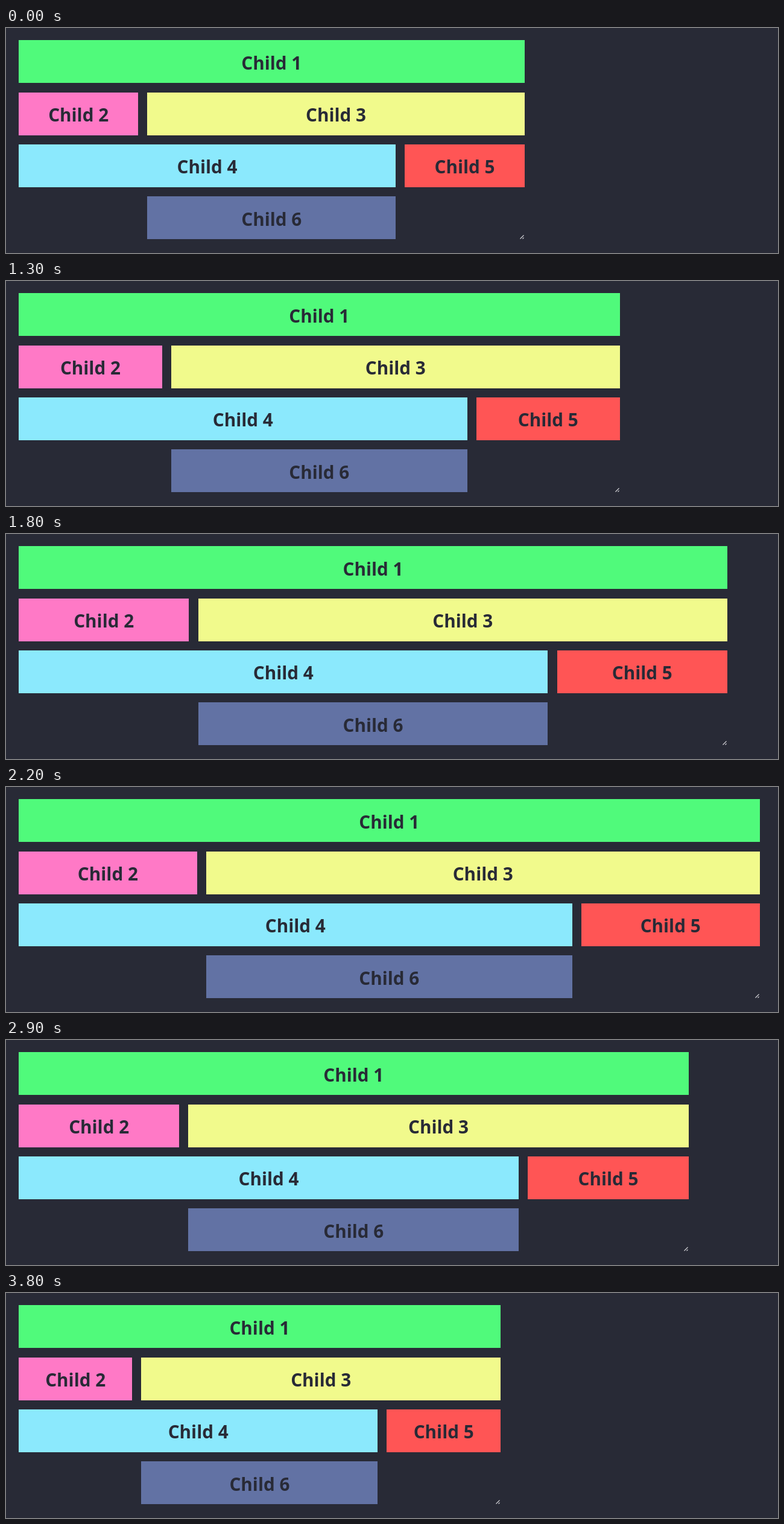
Write an HTML page that moves like this. It is 1280x373 px and loops after 5000 ms.

```html
<!DOCTYPE html>
<html lang="en">
<head>
<meta charset="utf-8">
<title>Resizable grid</title>
<style>
  html, body { margin: 0; width: 100%; height: 100%; overflow: hidden; background: #282a36; }
  svg { display: block; width: 1280px; height: 373px; }
  text { font: 700 29.7px "Open Sans", "Noto Sans", sans-serif; text-anchor: middle; fill: #282a36; }
  path { stroke: #d8d8dc; stroke-width: 1.1; fill: none; }
</style>
</head>
<body>
<svg id="stage" viewBox="0 0 1280 373"></svg>
<script>
const LOOP = 5000, STEP = 100, START = 1000;
const LEFT = 21, GAP = 15.2, COLS = 4;
const TOP = 20.3, PITCH = 86.33, HEIGHT = 71;
const REST = 859.6;

// Right edge of the grid, one value per step from START; the last one holds.
const EDGES = [
  872, 915, 968, 1017.6, 1050, 1077,
  1110, 1155, 1196, 1217, 1230, 1240,
  1249.5, 1253, 1255, 1255,
  1250, 1225, 1182, 1131.6, 1080, 1033,
  988, 946.5, 905, 868, 838, 821, 819.8
];

// row, first column, column span, colour
const CELLS = [
  [0, 0, 4, "#50fa7b"],
  [1, 0, 1, "#ff79c6"],
  [1, 1, 3, "#f1fa8c"],
  [2, 0, 3, "#8be9fd"],
  [2, 3, 1, "#ff5555"],
  [3, 1, 2, "#6272a4"]
];

const stage = document.getElementById("stage");

function add(tag, attrs) {
  const el = document.createElementNS("http://www.w3.org/2000/svg", tag);
  set(el, attrs);
  return stage.appendChild(el);
}

function set(el, attrs) {
  for (const key in attrs) el.setAttribute(key, attrs[key]);
}

const cells = CELLS.map(([row, col, span, fill], i) => {
  const top = TOP + row * PITCH;
  const box = add("rect", { y: Math.round(top), height: HEIGHT, fill });
  const label = add("text", { y: Math.round(top + 48.5) });
  label.textContent = "Child " + (i + 1);
  return { box, label, col, span };
});
const grip = add("path", { d: "M-7.5 349.5l6-6M-3.5 349.5l2-2" });

function edgeAt(time) {
  const step = Math.floor((time - START) / STEP);
  return step < 0 ? REST : EDGES[Math.min(step, EDGES.length - 1)];
}

function layout(right) {
  const width = (right - LEFT - GAP * (COLS - 1)) / COLS;
  for (const { box, label, col, span } of cells) {
    const x = LEFT + col * (width + GAP);
    const end = x + span * (width + GAP) - GAP;
    set(box, { x: Math.round(x), width: Math.round(end) - Math.round(x) });
    set(label, { x: (x + end) / 2 });
  }
  set(grip, { transform: `translate(${Math.round(right)} 0)` });
}

const begin = performance.now();
let shown;

function draw() {
  const edge = edgeAt((performance.now() - begin) % LOOP);
  if (edge !== shown) layout(shown = edge);
  requestAnimationFrame(draw);
}
draw();
</script>
</body>
</html>
```
